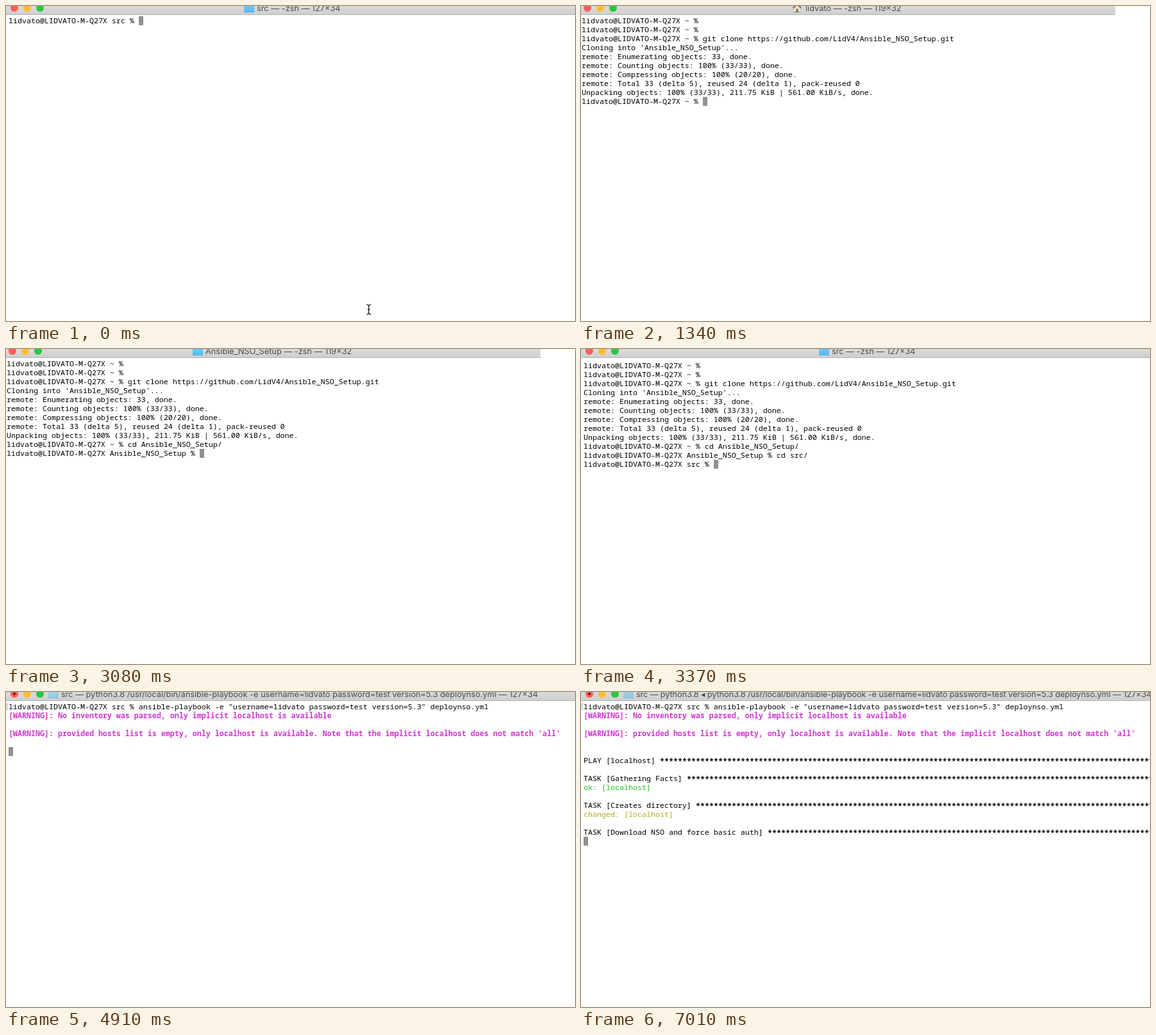
An HTML page that plays this animation: 887 px wide and 492 px high, repeating every 8000 ms.

```html
<!DOCTYPE html>
<html lang="en">
<head>
<meta charset="utf-8">
<title>Terminal session</title>
<style>
  html, body { margin: 0; width: 100%; height: 100%; overflow: hidden; background: #fff; }
  svg { display: block; width: 887px; height: 492px; }
  text { white-space: pre; }
  .line { font: 500 11.667px "Noto Sans Mono", monospace; fill: #000; }
  .warn { font-weight: 700; fill: #d338d3; }
  .ok { fill: #25bc24; }
  .changed { fill: #adad27; }
  .stars { font-weight: 700; }
  .title { font: 12.75px Inter, sans-serif; fill: #4b4b4b; }
</style>
</head>
<body>
<svg id="stage" viewBox="0 0 887 492">
  <defs>
    <linearGradient id="bar" x2="0" y2="1">
      <stop stop-color="#dadada"/><stop offset="1" stop-color="#cfcfcf"/>
    </linearGradient>
    <linearGradient id="blue" x2="0" y2="1">
      <stop stop-color="#6fcbfa"/><stop offset="1" stop-color="#55bdf3"/>
    </linearGradient>
    <g id="folder">
      <path d="M0-3H6L8-1H16V9.500H0Z" fill="url(#blue)"/>
      <path d="M0 9.500H16" stroke="#4aa9dd"/>
    </g>
    <g id="home">
      <path d="M2 2L7-3L12 2V9.500H2Z" fill="#ece3d2"/>
      <path d="M.5 3.500L7-2.500L13.500 3.500" fill="none" stroke="#a5633f" stroke-width="2"/>
      <path d="M5.500 4.500h3v5h-3Z" fill="#8a5a3c"/>
      <path d="M1.500 9.500H12.500" stroke="#7d9a5a"/>
    </g>
    <path id="ibeam" fill="none" stroke-linecap="round"
      d="M-3-7.500Q0-7.500 0-5Q0-7.500 3-7.500M0-5V5M-3 7.500Q0 7.500 0 5Q0 7.500 3 7.500M-1.500 0H1.500"/>
  </defs>
</svg>
<script>
const NS = "http://www.w3.org/2000/svg";
const LOOP = 8000, CELL = 7, ROW = 14;
const stage = document.getElementById("stage");

function add(parent, tag, attrs, text) {
  const el = document.createElementNS(NS, tag);
  for (const key in attrs) el.setAttribute(key, attrs[key]);
  if (text) el.textContent = text;
  return parent.appendChild(el);
}

const user = "lidvato", host = "LIDVATO-M-Q27X", repo = "Ansible_NSO_Setup";
const prompt = dir => `${user}@${host} ${dir} % `;
const banner = label => (label + " ").padEnd(127, "*");
const clone = `git clone https://github.com/LidV4/${repo}.git`;
const playbook = "ansible-playbook -e";
const vars = `username=${user} password=test version=5.3`;

// Terminal contents
const cloning = [prompt("~"), prompt("~"), prompt("~") + clone, `Cloning into '${repo}'...`];
const cloned = [...cloning,
  "remote: Enumerating objects: 33, done.",
  "remote: Counting objects: 100% (33/33), done.",
  "remote: Compressing objects: 100% (20/20), done.",
  "remote: Total 33 (delta 5), reused 24 (delta 1), pack-reused 0",
  "Unpacking objects: 100% (33/33), 211.75 KiB | 561.00 KiB/s, done."];
const inRepo = [...cloned, prompt("~") + `cd ${repo}/`];
const inSrc = [...inRepo, prompt(repo) + "cd src/"];
const command = [`${prompt("src")}${playbook} "${vars}" deploynso.yml`];
const warned = [...command,
  "[WARNING]: No inventory was parsed, only implicit localhost is available", "",
  "[WARNING]: provided hosts list is empty, only localhost is available. " +
  "Note that the implicit localhost does not match 'all'", ""];
const facts = [...warned, "", banner("PLAY [localhost]"), "", banner("TASK [Gathering Facts]")];
const created = [...facts, "ok: [localhost]", "", banner("TASK [Creates directory]")];
const download = [...created, "changed: [localhost]", "",
  banner("TASK [Download NSO and force basic auth]")];

// Title bars: x is the left edge of the text
const git = (x, name, job, more) =>
  ({ x, text: `${name} — ${job} — 119×32`, width: 833, left: 1, ...more });
const src = (x, job, more) =>
  ({ x, text: `src — ${job} — 127×34`, width: 887, left: 4, icon: "folder", ...more });

const run = `python3.8 /usr/local/bin/${playbook} ${vars} deploynso.yml`;
const shell = src(391, "-zsh");
const busy = src(86, run, { busy: true });
const nested = src(86, "python3.8 ◂ " + run, { busy: true, spacing: -0.11 });
const homeShell = git(350, user, "-zsh", { icon: "home" });
const homeClone = git(177, user, clone, { icon: "home", busy: true });
const repoShell = git(311, repo, "-zsh", { icon: "folder" });

const scenes = [
  { at: 0, bar: shell, lines: [prompt("src")], mouse: [565.5, 474] },
  { at: 1050, bar: homeClone, lines: [...cloning, ""], mouse: [326.5, 300] },
  { at: 1190, bar: homeShell, lines: [...cloned, prompt("~")], mouse: [326.5, 300] },
  { at: 1340, bar: homeShell, lines: [...cloned, prompt("~")] },
  { at: 2680, bar: homeShell, lines: [...cloned, prompt("~") + "cd "] },
  { at: 2780, bar: homeShell, lines: inRepo },
  { at: 3080, bar: repoShell, lines: [...inRepo, prompt(repo)] },
  { at: 3370, bar: shell, lines: [...inSrc, prompt("src")], shift: 3 },
  { at: 3570, bar: shell, lines: command, mouse: [565.5, 474] },
  { at: 4310, bar: busy, lines: [...command, ""], mouse: [565.5, 474] },
  { at: 4610, bar: busy, lines: [...command, ""], mouse: [580.5, 474] },
  { at: 4760, bar: busy, lines: [...command, ""] },
  { at: 4910, bar: busy, lines: [...warned, ""] },
  { at: 5210, bar: nested, lines: [...warned, ""] },
  { at: 5660, bar: nested, lines: [...facts, ""] },
  { at: 6560, bar: nested, lines: [...created, ""] },
  { at: 7010, bar: nested, lines: [...download, ""] }
];

function drawBar(g, bar) {
  add(g, "rect", { width: bar.width, height: 13, fill: "url(#bar)" });
  add(g, "rect", { y: 13, width: bar.width, height: 1, fill: "#b3b3b3" });
  ["#ff5f57", "#ffbd2e", "#28c940"].forEach((fill, i) =>
    add(g, "circle", { cx: bar.left + 9 + i * 20, cy: 3, r: 6, fill }));
  if (bar.busy) add(g, "circle", { cx: bar.left + 9, cy: 3, r: 2, fill: "#6b0a08" });
  add(g, "use", { href: "#" + bar.icon, x: bar.x - 20, opacity: bar.busy ? 0.5 : 1 });
  add(g, "text", { class: "title", x: bar.x, y: 8, "letter-spacing": bar.spacing || 0 }, bar.text);
}

function lineClass(line) {
  if (line.startsWith("[WARNING]")) return "line warn";
  if (line.startsWith("ok:")) return "line ok";
  if (line.startsWith("changed:")) return "line changed";
  return "line";
}

function drawLine(g, line, x, y) {
  const words = line.replace(/\*+$/, "");
  add(g, "text", { class: lineClass(line), x, y }, words);
  const stars = line.slice(words.length);
  // Stars sit at mid-height of the row
  if (stars) add(g, "text", { class: "line stars", x: x + words.length * CELL, y: y + 2 }, stars);
}

function buildScene({ bar, lines, mouse, shift = 0 }) {
  const g = add(stage, "g", { visibility: "hidden" });
  drawBar(g, bar);
  const last = lines.length - 1;
  add(g, "rect", {
    x: bar.left + lines[last].length * CELL, y: 16 + last * ROW + shift,
    width: CELL, height: ROW, fill: "#919191"
  });
  lines.forEach((line, i) => drawLine(g, line, bar.left, 27 + i * ROW + shift));
  if (bar.busy && bar.left > 1)
    add(g, "path", { d: "M3.500 18.500H1.500V27.500H3.500", fill: "none", stroke: "#a8a8a8" });
  if (mouse) {
    const [x, y] = mouse;
    add(g, "use", { href: "#ibeam", x, y, stroke: "#fff", "stroke-width": 3 });
    add(g, "use", { href: "#ibeam", x, y, stroke: "#000", "stroke-width": 1.2 });
  }
  return g;
}

const groups = scenes.map(buildScene);
const start = performance.now();
let shown = -1;

function frame() {
  const t = (performance.now() - start) % LOOP;
  const now = scenes.findLastIndex(s => s.at <= t);
  if (now !== shown) {
    groups.forEach((g, i) => g.setAttribute("visibility", i === now ? "visible" : "hidden"));
    shown = now;
  }
  requestAnimationFrame(frame);
}
frame();
</script>
</body>
</html>
```
